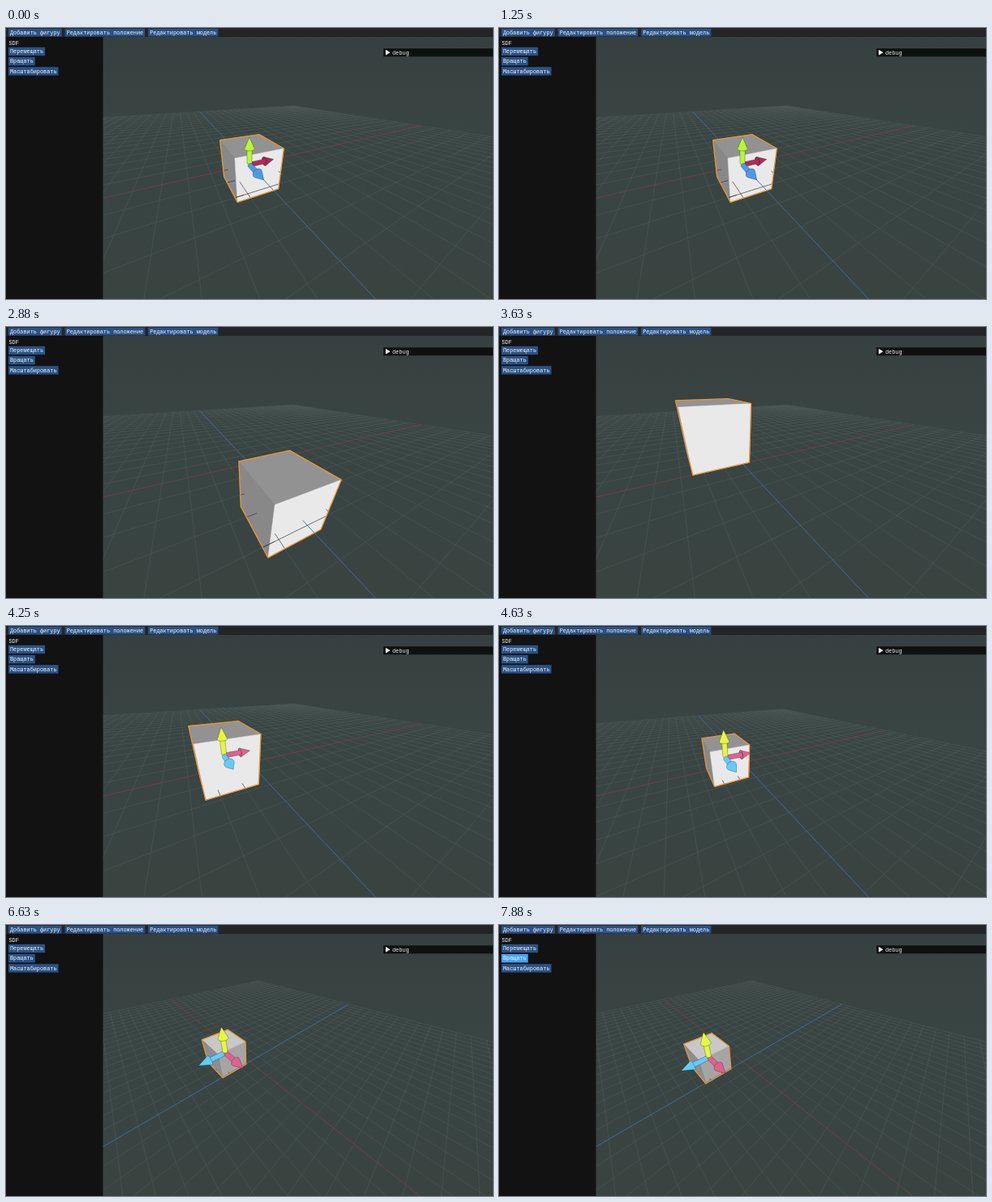
An HTML page with a canvas that plays this animation: 600 by 335 pixels, repeating every 8000 ms.

```html
<!DOCTYPE html>
<html lang="ru">
<head>
<meta charset="utf-8">
<style>
html, body { margin: 0; width: 100%; height: 100%; overflow: hidden; background: #121212; }
canvas { display: block; }
</style>
</head>
<body>
<canvas id="stage" width="600" height="335"></canvas>
<script>
const ctx = document.getElementById('stage').getContext('2d');
const LOOP = 8000, STEP = 125;
const CENTER = { x: 300, y: 169 }, FOCAL = 167.5;
const GRID = 20, HALF = 1.15, NEAR = 0.2;
const CHAR_WIDTH = 4.11;
const AXIS_COLORS = ['#e2608c', '#e6f83a', '#62ccfa'];
const AXIS_DIM = ['#b02c54', '#b8f634', '#4c9ae6'];

const progress = (t, from, to) => Math.min(1, Math.max(0, (t - from) / (to - from)));
const ease = (t, from, to) => {
  const u = progress(t, from, to);
  return u * u * (3 - 2 * u);
};
const bump = (t, from, to) => Math.sin(Math.PI * progress(t, from, to)) ** 2;
const wave = (t, from, to) => Math.sin(2 * Math.PI * progress(t, from, to));
const between = (t, from, to) => t >= from && t < to;

let cam;

function setCamera(t) {
  const pull = ease(t, 4250, 4600), tilt = ease(t, 4700, 5125), spin = ease(t, 6000, 6500);
  const pitch = (29.6 + 16.4 * tilt - 3.3 * spin) * Math.PI / 180;
  const yaw = (24.8 - 9.5 * tilt - 64.7 * spin) * Math.PI / 180;
  const dist = 7.1 + 2.95 * pull + .95 * tilt + .25 * spin;
  cam = { cp: Math.cos(pitch), sp: Math.sin(pitch), cy: Math.cos(yaw), sy: Math.sin(yaw), dist };
  cam.dir = [-cam.sy * cam.cp, cam.sp, cam.cy * cam.cp];
  cam.pos = cam.dir.map(v => v * dist);
}

// Each axis is dragged out and back, then settles
function cubeCenter(t) {
  return [
    .11 * ease(t, 1750, 2000) + 4.1 * bump(t, 2250, 2900)
      - 1.47 * ease(t, 2700, 3600) - 4 * wave(t, 5200, 5750),
    1.86 * ease(t, 2900, 3600) + .8 * bump(t, 3650, 4150) - 1.03 * ease(t, 3700, 4200),
    2.7 * bump(t, 2500, 3200) + .28 * ease(t, 3700, 4200) + 1.08 * ease(t, 5200, 5750)
      + 4 * wave(t, 7000, 7700) + .85 * ease(t, 7300, 7750)
  ];
}

const isDragging = t =>
  between(t, 1375, 4250) || between(t, 5250, 5875) || between(t, 7000, 7870);

function toView([x, y, z]) {
  const forward = x * cam.sy - z * cam.cy;
  return [
    x * cam.cy + z * cam.sy,
    y * cam.cp + forward * cam.sp,
    cam.dist + forward * cam.cp - y * cam.sp
  ];
}

function toScreen([x, y, depth]) {
  const s = FOCAL / Math.max(depth, NEAR);
  return [CENTER.x + x * s, CENTER.y - y * s];
}

const project = p => toScreen(toView(p));

function trace(points) {
  ctx.beginPath();
  points.forEach(p => ctx.lineTo(p[0], p[1]));
  ctx.closePath();
}

function paint(points, fill, edge = fill, width = .5) {
  trace(points);
  ctx.fillStyle = fill;
  ctx.strokeStyle = edge;
  ctx.lineWidth = width;
  ctx.fill();
  ctx.stroke();
}

function hull(points) {
  const sorted = [...points].sort((a, b) => a[0] - b[0] || a[1] - b[1]);
  const half = list => {
    const out = [];
    for (const p of list) {
      while (out.length > 1) {
        const [a, b] = out.slice(-2);
        if ((b[0] - a[0]) * (p[1] - a[1]) > (b[1] - a[1]) * (p[0] - a[0])) break;
        out.pop();
      }
      out.push(p);
    }
    return out.slice(0, -1);
  };
  return [...half(sorted), ...half(sorted.reverse())];
}

function addLine(a, b) {
  let p = toView(a), q = toView(b);
  if (p[2] > q[2]) [p, q] = [q, p];
  if (q[2] < NEAR) return;
  if (p[2] < NEAR) {
    const u = (NEAR - p[2]) / (q[2] - p[2]);
    p = p.map((v, i) => v + (q[i] - v) * u);
  }
  ctx.moveTo(...toScreen(p));
  ctx.lineTo(...toScreen(q));
}

function strokeLine(a, b, color) {
  ctx.beginPath();
  addLine(a, b);
  ctx.strokeStyle = color;
  ctx.stroke();
}

function drawGrid(x0, x1, z0, z1, color) {
  ctx.lineWidth = .9;
  ctx.beginPath();
  for (let i = -GRID; i <= GRID; i++) {
    if (!i) continue;
    if (i >= x0 && i <= x1) addLine([i, 0, z0], [i, 0, z1]);
    if (i >= z0 && i <= z1) addLine([x0, 0, i], [x1, 0, i]);
  }
  ctx.strokeStyle = color;
  ctx.stroke();
  if (z0 <= 0 && z1 >= 0) strokeLine([x0, 0, 0], [x1, 0, 0], '#763e4b');
  if (x0 <= 0 && x1 >= 0) strokeLine([0, 0, z0], [0, 0, z1], '#476c98');
}

function drawCube(c) {
  const corners = [];
  for (let axis = 0; axis < 3; axis++) for (const side of [-1, 1]) {
    const face = [0, 1, 2, 3].map(i => {
      const angle = (i + .5) * Math.PI / 2, p = [...c];
      p[axis] += side * HALF;
      p[(axis + 1) % 3] += Math.sign(Math.cos(angle)) * HALF;
      p[(axis + 2) % 3] += Math.sign(Math.sin(angle)) * HALF;
      return project(p);
    });
    corners.push(...face);
    if (side * (cam.pos[axis] - c[axis]) <= HALF) continue;
    const light = Math.round(Math.min(236, 297 * Math.max(.46, side * cam.dir[axis])));
    paint(face, `rgb(${light},${light - 1},${light})`);
  }
  const outline = hull(corners);

  // Floor lines lying between the camera and the cube
  ctx.save();
  trace(outline);
  ctx.clip();
  const ink = 'rgba(50,55,58,.75)', [x, , z] = c;
  if (cam.pos[2] > z + HALF) drawGrid(-GRID, GRID, z + HALF, GRID, ink);
  if (cam.pos[0] < x - HALF) drawGrid(-GRID, x - HALF, -GRID, GRID, ink);
  if (cam.pos[0] > x + HALF) drawGrid(x + HALF, GRID, -GRID, GRID, ink);
  ctx.restore();

  trace(outline);
  ctx.strokeStyle = '#e8952f';
  ctx.lineWidth = 1.3;
  ctx.lineJoin = 'round';
  ctx.stroke();
}

function drawGizmo(c, colors) {
  const size = toView(c)[2] * .21, edge = 'rgba(20,40,50,.45)';
  const along = (axis, dist) => c.map((v, i) => v + (i === axis ? dist * size : 0));
  const ring = (axis, dist, radius) => Array.from({ length: 16 }, (_, i) => {
    const p = along(axis, dist), a = i * Math.PI / 8;
    p[(axis + 1) % 3] += Math.cos(a) * radius * size;
    p[(axis + 2) % 3] += Math.sin(a) * radius * size;
    return project(p);
  });
  const depth = axis => toView(along(axis, 1))[2];
  const farFirst = [0, 1, 2].sort((a, b) => depth(b) - depth(a));
  for (const axis of farFirst) {
    const base = ring(axis, .6, .165);
    const shaft = hull([...ring(axis, .06, .085), ...ring(axis, .62, .085)]);
    const cone = hull([...base, project(along(axis, 1))]);
    const parts = cam.dir[axis] > 0 ? [shaft, cone] : [cone, base, shaft];
    parts.forEach(part => paint(part, colors[axis], edge, .7));
  }
}

function label(text, x, y) {
  ctx.fillStyle = '#f4f6f8';
  ctx.fillText(text, x, y);
}

function button(text, x, y, h, hot) {
  const w = text.length * CHAR_WIDTH + 4;
  ctx.fillStyle = hot ? '#46a4f6' : '#2a5286';
  ctx.fillRect(x, y, w, h);
  label(text, x + 2, y + h / 2 + 2.2);
  return w;
}

function drawInterface(t) {
  ctx.font = '6.85px "Liberation Mono", "DejaVu Sans Mono", monospace';
  ctx.fillStyle = '#121212';
  ctx.fillRect(0, 11, 119.5, 324);
  ctx.fillStyle = '#232526';
  ctx.fillRect(0, 0, 600, 11);

  let x = 3;
  for (const text of ['Добавить фигуру', 'Редактировать положение', 'Редактировать модель']) {
    x += button(text, x, .8, 9.6) + 4;
  }

  label('SDF', 3.5, 20.7);
  const hot = t < 7750 ? -1 : t < 7870 ? 0 : 1;
  ['Перемещать', 'Вращать', 'Масштабировать'].forEach((text, i) =>
    button(text, 3, 23.8 + i * 12.2, 10.4, i === hot));

  ctx.fillStyle = '#0f1010';
  ctx.fillRect(465, 25.3, 135, 10);
  paint([[468, 27.3], [473, 30.3], [468, 33.3]], '#f4f6f8');
  label('debug', 476, 32.8);
}

function draw(now) {
  const t = Math.floor((now % LOOP) / STEP) * STEP;
  const sky = ctx.createLinearGradient(0, 11, 0, 335);
  sky.addColorStop(0, '#364040');
  sky.addColorStop(.4, '#394543');
  sky.addColorStop(1, '#394441');
  ctx.fillStyle = sky;
  ctx.fillRect(0, 0, 600, 335);

  setCamera(t);
  const cube = cubeCenter(t);
  drawGrid(-GRID, GRID, -GRID, GRID, 'rgba(125,135,132,.19)');
  drawCube(cube);
  if (!isDragging(t)) drawGizmo(cube, t < 2000 ? AXIS_DIM : AXIS_COLORS);
  drawInterface(t);
}

const start = performance.now();
function tick() {
  draw(performance.now() - start);
  requestAnimationFrame(tick);
}
tick();
</script>
</body>
</html>
```
